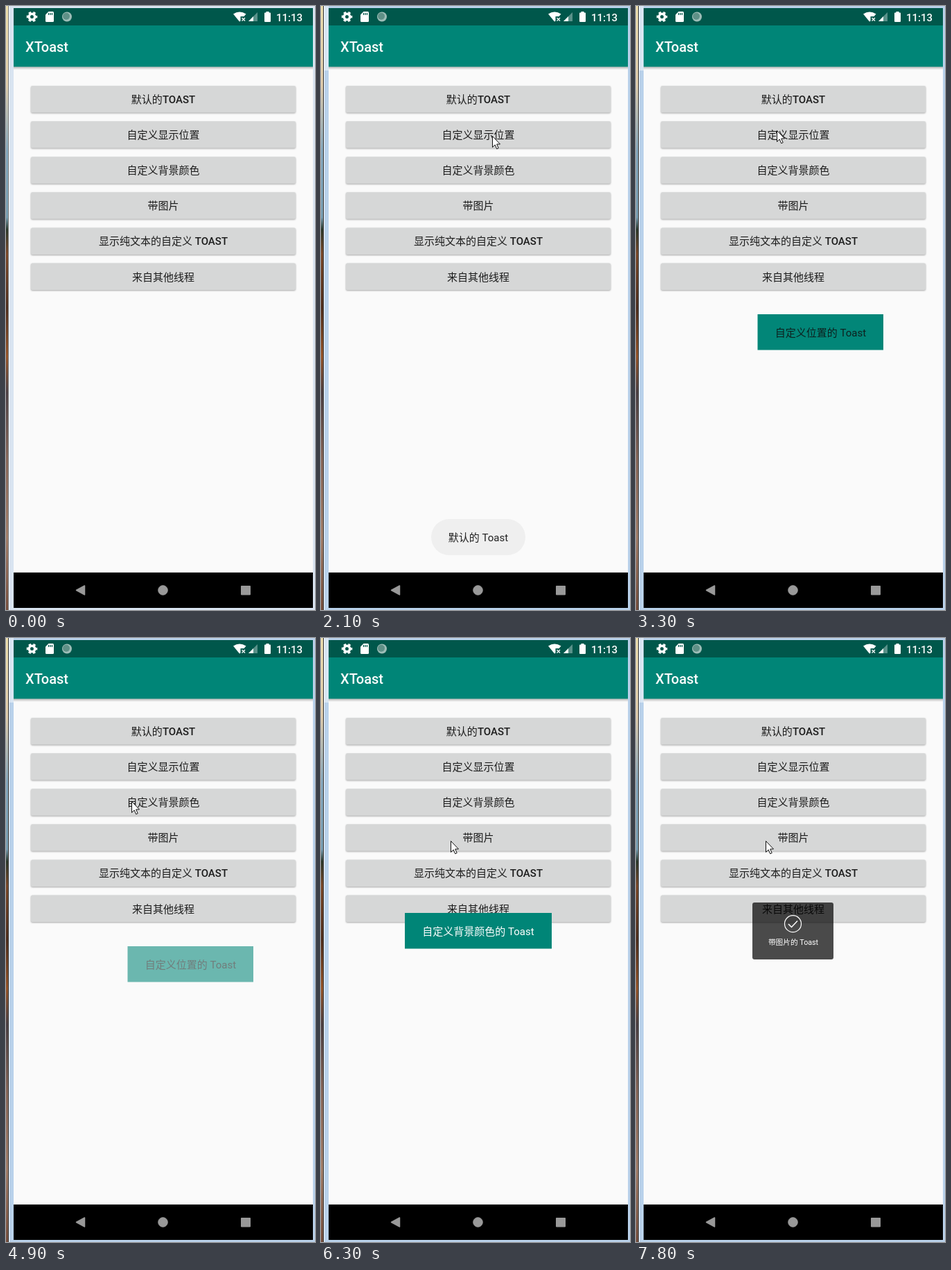
Recreate the animation shown at these times as an HTML page. Size 446 px wide and 870 px high, loop 8000 ms.

```html
<!DOCTYPE html>
<html lang="zh-CN">
<head>
<meta charset="utf-8">
<title>XToast</title>
<style>
html, body { margin: 0; width: 100%; height: 100%; overflow: hidden; }
svg { display: block; }
text { font: 15px Roboto, 'Noto Sans CJK SC', 'Noto Sans CJK', sans-serif; }
.medium { font-weight: 500; }
.mid { text-anchor: middle; }
.button { fill: #d6d7d7; filter: drop-shadow(0 1px 1px #0005); }
</style>
</head>
<body>
<svg id="stage" width="446" height="870" viewBox="0 0 446 870">
  <defs>
    <linearGradient id="wallpaper" x2="0" y2="1">
      <stop offset="0" stop-color="#efe0ae"/>
      <stop offset=".13" stop-color="#e3cfae"/>
      <stop offset=".24" stop-color="#87aac0"/>
      <stop offset=".35" stop-color="#7aa0b4"/>
      <stop offset=".37" stop-color="#2c3a2c"/>
      <stop offset=".41" stop-color="#7d4a2a"/>
      <stop offset=".5" stop-color="#50301f"/>
      <stop offset=".58" stop-color="#98572b"/>
      <stop offset=".64" stop-color="#4e4246"/>
      <stop offset=".75" stop-color="#8a6a5c"/>
      <stop offset=".88" stop-color="#a5816c"/>
      <stop offset="1" stop-color="#77503f"/>
    </linearGradient>
    <linearGradient id="barShadow" x2="0" y2="1">
      <stop offset="0" stop-opacity=".3"/>
      <stop offset="1" stop-opacity="0"/>
    </linearGradient>
  </defs>

  <rect id="frame" width="446" height="870"/>
  <rect id="glow" x="5" width="6" height="93" fill="#e2ebf5"/>
  <rect width="3" height="870" fill="url(#wallpaper)"/>
  <path id="edge" d="M3.5 0V870"/>
  <path d="M4.5 0V870" stroke="#f4f8fc"/>

  <rect x="11" y="3" width="432" height="813" fill="#fafafa"/>
  <rect x="11" y="87" width="432" height="5" fill="url(#barShadow)"/>
  <rect x="11" y="28" width="432" height="59.5" fill="#008577"/>
  <rect x="11" y="3" width="432" height="25" fill="#00574b"/>
  <rect x="11" y="816" width="432" height="51" fill="#000"/>
  <text class="medium" x="28" y="66" fill="#fff" style="font-size:20px">XToast</text>

  <g fill="#fff">
    <circle cx="37.5" cy="15.5" r="4.2" fill="none" stroke="#fff" stroke-width="3.4"/>
    <circle cx="37.5" cy="15.5" r="6.6" fill="none" stroke="#fff" stroke-width="2.4" stroke-dasharray="3.6 3.31" stroke-dashoffset="1.8"/>
    <path d="M61.500 8H67.500Q69 8 69 9.500V21.500Q69 23 67.500 23H58.500Q57 23 57 21.500V12.500Z"/>
    <path d="M61.500 10v3M64 10v3M66.500 10v3" stroke="#00574b" stroke-width="1.300"/>
    <circle cx="88" cy="15.500" r="7" fill="#9dbdb7"/>
    <circle cx="87" cy="14.700" r="5" fill="#5f9087"/>
    <path d="M328 11.500Q337 5.500 346.500 11.500L343.500 15H338.500V21.500L337 22.500Z"/>
    <path d="M340.500 17l4.500 4.500m0-4.500l-4.500 4.500" stroke="#fff" stroke-width="1.300"/>
    <path d="M363 9V22H350Z" opacity=".35"/>
    <path d="M357 15V22H350Z"/>
    <path d="M375.500 9.500V8H379.500V9.500H381Q382 9.500 382 10.500V22Q382 23 381 23H374Q373 23 373 22V10.500Q373 9.500 374 9.500Z"/>
    <text class="medium" x="390" y="21.500">11:13</text>
  </g>

  <g fill="#999" stroke="#999" stroke-linejoin="round">
    <path d="M101.500 841.500L113.500 835V848Z" stroke-width="1.500"/>
    <circle cx="226.500" cy="841.500" r="6.800"/>
    <rect x="339.500" y="835.500" width="13" height="12.500"/>
  </g>

  <g id="buttons"></g>

  <g class="toast">
    <rect x="159" y="739" width="136" height="52" rx="26" fill="#efefef"/>
    <text class="mid" x="227" y="771" fill="#222">默认的 Toast</text>
  </g>
  <g class="toast">
    <rect x="175.500" y="444" width="181.500" height="51.500" fill="#008577"/>
    <text class="mid" x="266.500" y="476" fill="#0b1f1d">自定义位置的 Toast</text>
  </g>
  <g class="toast">
    <rect x="121" y="396" width="212" height="51.500" fill="#008577"/>
    <text class="mid" x="227" y="428" fill="#fff">自定义背景颜色的 Toast</text>
  </g>
  <g class="toast">
    <rect x="168" y="381" width="117" height="82" rx="3" fill="#000" fill-opacity=".7"/>
    <g fill="none" stroke="#fff">
      <circle cx="226.500" cy="411.700" r="12" stroke-width="1.200"/>
      <path d="M220 412l4.500 4.500l8.500-9" stroke-width="1.500"/>
    </g>
    <text class="mid" x="227" y="441.500" fill="#fff" style="font-size:10.700px">带图片的 Toast</text>
  </g>

  <path id="cursor" d="M.5 .5V16.500L4.200 13L6.700 18.800L9.200 17.700L6.700 12H11.500Z" fill="#fff" stroke="#111" stroke-linejoin="round"/>
</svg>
<script>
const LOOP = 8000, STEP = 100, FOCUS = 400;
const labels = ['默认的TOAST', '自定义显示位置', '自定义背景颜色', '带图片', '显示纯文本的自定义 TOAST', '来自其他线程'];
// Press time and x of the first four buttons
const presses = [[450, 245], [2750, 203], [5050, 181], [7150, 187]];
// Fade-in and fade-out start of each toast
const toastTimes = [[565, 2630], [2850, 4572], [5165, 7000], [7265, Infinity]];
// Pointer stops: time, x, y
const stops = [
  [0, 446, 870], [400, 245, 132], [950, 245, 132], [1400, 258, 255], [1650, 258, 255],
  [2100, 247, 187], [2400, 203, 179], [3650, 203, 179], [3900, 160, 283], [4050, 160, 283],
  [4400, 181, 235], [5350, 181, 235], [5500, 185, 345], [5800, 187, 324], [6050, 187, 324],
  [6300, 187, 292], [8000, 187, 292]
];

const $ = id => document.getElementById(id);
const clamp = v => Math.min(1, Math.max(0, v));
const mix = (a, b, p) => a + (b - a) * p;
const set = (el, attrs) => Object.entries(attrs).forEach(([k, v]) => el.setAttribute(k, v));

$('buttons').innerHTML = labels.map((label, i) => `
  <g transform="translate(36 ${115 + i * 51.1})">
    <rect class="button" width="382" height="38.500" rx="2"/>
    <svg class="ripple" width="382" height="38.500" overflow="hidden">
      <rect width="382" height="38.500" rx="2" fill-opacity=".07"/>
      <circle cy="19" fill-opacity=".04"/>
    </svg>
    <text class="mid" x="191" y="25" fill="#1c1c1c">${label.replace('TOAST', '<tspan class="medium">TOAST</tspan>')}</text>
  </g>`).join('');

const ripples = document.querySelectorAll('.ripple');
const toasts = document.querySelectorAll('.toast');

function drawRipple(el, t, press) {
  const [start, x] = press || [Infinity, 0];
  const grow = clamp((t - start) / 300);
  const fade = clamp((t - start - 250) / 200);
  set(el, { opacity: t < start ? 0 : clamp((t - start) / 80) * (1 - fade) });
  set(el.lastElementChild, { cx: mix(x - 36, 191, grow * .45), r: 196 * grow });
}

function drawCursor(t) {
  const i = stops.findIndex(s => s[0] > t);
  const [t0, x0, y0] = stops[i - 1], [t1, x1, y1] = stops[i];
  const p = (t - t0) / (t1 - t0), e = p * p * (3 - 2 * p);
  set($('cursor'), {
    transform: `translate(${Math.round(mix(x0, x1, e))} ${Math.round(mix(y0, y1, e))})`
  });
}

function draw(now) {
  const t = Math.floor(now % LOOP / STEP) * STEP;
  const focused = t >= FOCUS;
  set($('frame'), { fill: focused ? '#b9d1ea' : '#d9e4f1' });
  set($('glow'), { opacity: focused ? .8 : 0 });
  set($('edge'), { stroke: focused ? '#2b2b2b' : '#777' });
  ripples.forEach((el, i) => drawRipple(el, t, presses[i]));
  toasts.forEach((el, i) => {
    const [start, end] = toastTimes[i];
    const enter = clamp((t - start) / 500), leave = clamp((t - end) / 500);
    set(el, { opacity: (1 - (1 - enter) ** 2) * (1 - leave ** 2) });
  });
  drawCursor(t);
  requestAnimationFrame(draw);
}
draw(0);
</script>
</body>
</html>
```
